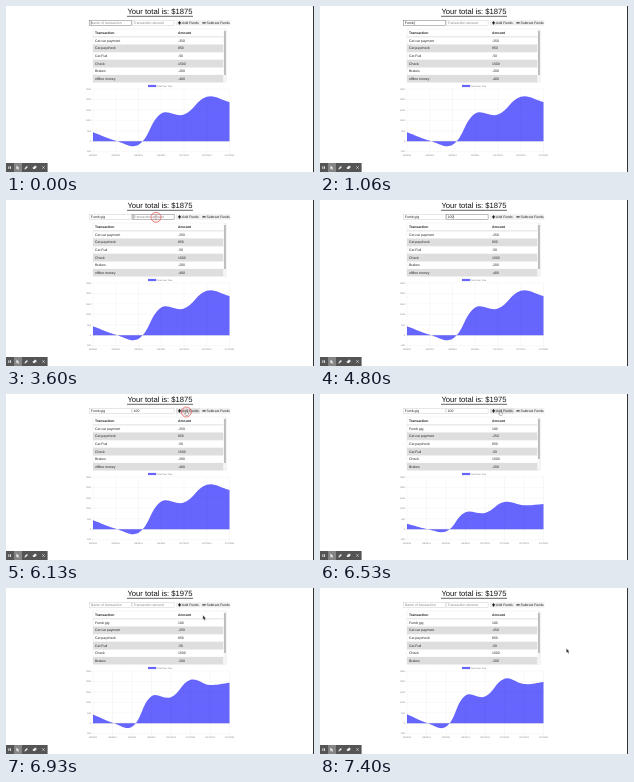
These frames come from a looping animation (308 px wide and 166 px high, 8000 ms). An HTML page:

```html
<!DOCTYPE html>
<html lang="en">
<head>
<meta charset="utf-8">
<title>Budget tracker</title>
<style>
html, body { margin: 0; width: 100%; height: 100%; overflow: hidden; background: #fff; }
svg { display: block; width: 100vw; height: 100vh; }
text { font-family: Arial, "Liberation Sans", sans-serif; font-size: 3.45px; fill: #222; text-rendering: geometricPrecision; white-space: pre; }
.tick { font-size: 2.2px; fill: #777; }
.hint { fill: #858585; }
.bold { font-weight: bold; }
</style>
</head>
<body>
<svg id="stage" viewBox="0 0 308 166"></svg>
<script>
const LOOP = 8000, SAVED = 6400, CLEARED = 6600, GROW_FROM = 6320;
const stage = document.getElementById('stage');

function add(tag, attrs, parent = stage, content) {
  const el = document.createElementNS('http://www.w3.org/2000/svg', tag);
  for (const key in attrs) el.setAttribute(key, attrs[key]);
  if (content !== undefined) el.textContent = content;
  parent.appendChild(el);
  return el;
}
const set = (el, attrs) => { for (const key in attrs) el.setAttribute(key, attrs[key]); };
const rect = (x, y, width, height, fill, parent, more) => add('rect', { x, y, width, height, fill, ...more }, parent);
const label = (x, y, str, cls = '', parent, more) => add('text', { x, y, class: cls, ...more }, parent, str);
const line = (x1, y1, x2, y2, stroke, width, parent) => add('line', { x1, y1, x2, y2, stroke, 'stroke-width': width }, parent);
const show = (el, on) => el.setAttribute('visibility', on ? 'visible' : 'hidden');
const within = (t, a, b) => t >= a && t < b;

// Title
rect(0, 0, 308, 166, '#fff');
const title = label(154, 8.2, '', '', stage, { 'text-anchor': 'middle', style: 'font-size:7.65px;fill:#111' });
line(121, 10.3, 187, 10.3, '#222', 0.7);

// Form
function makeField(x, hint) {
  const box = rect(x, 14.4, 42, 5.2, '#fff', stage, { 'stroke-width': 0.4 });
  return { x, hint, box, text: label(x + 1.5, 18.1, ''), caret: rect(x, 15.2, 0.35, 3.6, '#222') };
}
const nameField = makeField(83.3, 'Name of transaction');
const amountField = makeField(126.1, 'Transaction amount');

function makeButton(x, width, str, plus) {
  const box = rect(x, 14.2, width, 5.5, '#efefef');
  rect(x + 2, 16.4, 3.2, 1, '#111');
  if (plus) rect(x + 3.1, 15.3, 1, 3.2, '#111');
  label(x + 6.1, 18.1, str);
  return box;
}
const addButton = makeButton(170, 24.2, 'Add Funds', true);
makeButton(194.4, 30, 'Subtract Funds', false);

// Table
const clip = add('clipPath', { id: 'tableArea' });
rect(87, 23, 133.5, 53.6, '#000', clip);
const table = add('g', { 'clip-path': 'url(#tableArea)' });
label(89, 28, 'Transaction', 'bold', table);
label(172, 28, 'Amount', 'bold', table);
line(87, 30.8, 217.5, 30.8, '#ccc', 0.5, table);
const rows = [];
for (let i = 0; i < 6; i++) {
  const y = 31 + i * 7.6;
  if (i % 2) rect(87, y, 130.5, 7.6, '#dedede', table);
  line(87, y, 217.5, y, '#ddd', 0.25, table);
  rows.push([label(89, y + 4.8, '', '', table), label(172, y + 4.8, '', '', table)]);
}
rect(217.5, 23, 2.9, 53.6, '#f5f5f5', table);
const thumb = rect(218, 25, 1.9, 44, '#bdbdbd', table);
rect(87, 23, 133.5, 53.6, 'none', stage, { stroke: '#ddd', 'stroke-width': 0.3 });

const entries = [
  ['Cat car payment', -250], ['Cat paycheck', 850], ['Cat Fud', -50],
  ['Check', 1500], ['Brakes', -200], ['offline money', -400]
];
const newName = 'Fumb gig', newAmount = '100';
const totals = [425];
[...entries].reverse().forEach(e => totals.push(totals[totals.length - 1] + e[1]));

// Chart
const LEFT = 87, RIGHT = 223.5, ZERO = 135.2, UNIT = 0.0209;
const py = v => ZERO - v * UNIT;
rect(142, 78.9, 8.2, 2.2, '#6666ff');
label(151, 80.8, 'Total Over Time', 'tick');
const fill = add('path', { fill: '#6666ff' });
for (let v = -500; v <= 2500; v += 500) {
  line(LEFT - 1.5, py(v), RIGHT, py(v), v ? 'rgba(0,0,0,.1)' : 'rgba(0,0,0,.25)', 0.3);
  label(85, py(v) + 0.8, v, 'tick', stage, { 'text-anchor': 'end' });
}
const grid = add('g', {});

function curve(values, grow) {
  const pts = values.map((v, i) => [LEFT + (RIGHT - LEFT) * i / (values.length - 1), py(v)]);
  const controls = pts.map((p, i) => {
    const a = pts[i - 1] || p, b = pts[i + 1] || p;
    const d1 = Math.hypot(p[0] - a[0], p[1] - a[1]), d2 = Math.hypot(b[0] - p[0], b[1] - p[1]);
    const at = f => [p[0] + f * (b[0] - a[0]), p[1] + f * (b[1] - a[1])];
    return [at(-0.4 * d1 / (d1 + d2)), at(0.4 * d2 / (d1 + d2))];
  });
  const out = p => p[0].toFixed(2) + ' ' + (ZERO + (p[1] - ZERO) * grow).toFixed(2);
  let d = `M${LEFT} ${ZERO}L${out(pts[0])}`;
  for (let i = 1; i < pts.length; i++) {
    d += `C${out(controls[i - 1][1])},${out(controls[i][0])},${out(pts[i])}`;
  }
  return d + `L${RIGHT} ${ZERO}Z`;
}

// Recorder bar and the dark right edge of the screen
rect(307, 0, 1, 166, '#333');
const bar = add('g', { fill: '#eee' });
rect(0, 157, 41.6, 9, '#555', bar);
rect(8, 157, 8, 9, '#858585', bar);
rect(2.4, 160.3, 0.9, 2.6, '#eee', bar);
rect(4.1, 160.3, 0.9, 2.6, '#eee', bar);
add('path', { d: 'M10.4 159.5v4l1-.9.7 1.3.7-.4-.7-1.3h1.3z' }, bar);
add('path', { d: 'M18.4 163.4l.5-1.5 2-2 1 1-2 2z' }, bar);
add('path', { d: 'M26.8 163l.4-1.7 2-1.8 1.7 1.5-2 2z' }, bar);
add('path', { d: 'M36.3 160.3l2.4 2.4m0-2.4l-2.4 2.4', stroke: '#eee', 'stroke-width': 0.6 }, bar);

// Pointers
const ring = add('circle', { r: 5, fill: 'rgba(230,70,70,.08)', stroke: '#df5555', 'stroke-width': 0.7 });
const beam = add('path', { d: 'M-1-2.2h2M0-2.2v4.4M-1 2.2h2', stroke: '#777', 'stroke-width': 0.3, fill: 'none' });
const hand = add('path', { d: 'M-.4-2.2q.5-.5.9 0v1.8l1.6.5v1.4l-.6 1.2h-2l-1.3-1.8.5-.4.9.6z', fill: '#fff', stroke: '#222', 'stroke-width': 0.3 });
const arrow = add('path', { d: 'M0 0v4.3l1-.9.8 1.7.8-.4-.8-1.6h1.4z', fill: '#222', stroke: '#fff', 'stroke-width': 0.25 });

const nameKeys = [400, 660, 800, 930, 1060, 1530, 1600, 1730];
const amountKeys = [4460, 4660, 4800];

function drawField(f, value, keys, t, start, focused) {
  f.text.textContent = value || f.hint;
  f.text.setAttribute('class', value ? '' : 'hint');
  set(f.box, { stroke: focused ? '#555' : '#c4c4c4' });
  const last = keys.filter(k => k <= t).pop() ?? start;
  show(f.caret, focused && Math.floor((t - last) / 530) % 2 === 0);
  f.caret.setAttribute('x', f.x + 1.6 + (value ? f.text.getComputedTextLength() : 0));
}

let saved = null;
function drawData(isSaved) {
  if (isSaved === saved) return;
  saved = isSaved;
  const list = saved ? [[newName, newAmount], ...entries] : entries;
  rows.forEach((row, i) => row.forEach((cell, j) => cell.textContent = list[i][j]));
  title.textContent = 'Your total is: $' + (saved ? 1975 : 1875);
  thumb.setAttribute('height', saved ? 40 : 44);
  grid.replaceChildren();
  const n = saved ? 8 : 7;
  for (let i = 0; i < n; i++) {
    const x = LEFT + (RIGHT - LEFT) * i / (n - 1);
    line(x, 83, x, 147.3, 'rgba(0,0,0,.1)', 0.3, grid);
    label(x, 149.9, i < 4 ? '2/8/2021' : '2/17/2021', 'tick', grid, { 'text-anchor': 'middle' });
  }
}

function glide(t, a, b, from, to) {
  const k = Math.min(1, Math.max(0, (t - a) / (b - a)));
  return from.map((v, i) => v + (to[i] - v) * k);
}
const place = (el, p) => el.setAttribute('transform', `translate(${p[0]} ${p[1]})`);
const fieldSpot = [150, 17.3], buttonSpot = [180.3, 18], exitSpot = [231, 46.5];

function draw(t) {
  drawData(t >= SAVED);
  const grow = saved ? 1 - Math.pow(1 - Math.min(1, (t - GROW_FROM) / 1000), 4) : 1;
  fill.setAttribute('d', curve(saved ? [...totals, 1975] : totals, grow));

  const typed = (str, keys) => t < CLEARED ? str.slice(0, keys.filter(k => k <= t).length) : '';
  drawField(nameField, typed(newName, nameKeys), nameKeys, t, 0, t < 3400);
  drawField(amountField, typed(newAmount, amountKeys), amountKeys, t, 3400, within(t, 3400, 6130));

  set(addButton, { fill: within(t, 5800, 6900) ? '#e0e0e0' : '#efefef' });

  const onTitle = within(t, 2460, 2530);
  const toButton = glide(t, 5600, 5860, fieldSpot, buttonSpot);
  show(beam, onTitle || within(t, 2800, 4460) || within(t, 5600, 5740));
  if (onTitle) place(beam, [136, 7.5]);
  else if (t < 3330) place(beam, glide(t, 2800, 2930, [166, 16.8], [160, 16.8]));
  else if (t < 5600) place(beam, glide(t, 3330, 3400, [160, 16.8], fieldSpot));
  else place(beam, toButton);

  show(hand, within(t, 5740, 6900));
  place(hand, [toButton[0], toButton[1] + 0.8]);

  const firstClick = within(t, 3400, 3660);
  show(ring, firstClick || within(t, 6130, SAVED));
  place(ring, firstClick ? fieldSpot : buttonSpot);

  show(arrow, t >= 6900);
  place(arrow, t < 7200 ? glide(t, 6800, 7200, buttonSpot, exitSpot) : glide(t, 7200, 7400, exitSpot, [246.4, 60.5]));
}

function frame(now) {
  draw(now % LOOP);
  requestAnimationFrame(frame);
}
draw(0);
requestAnimationFrame(frame);
</script>
</body>
</html>
```
